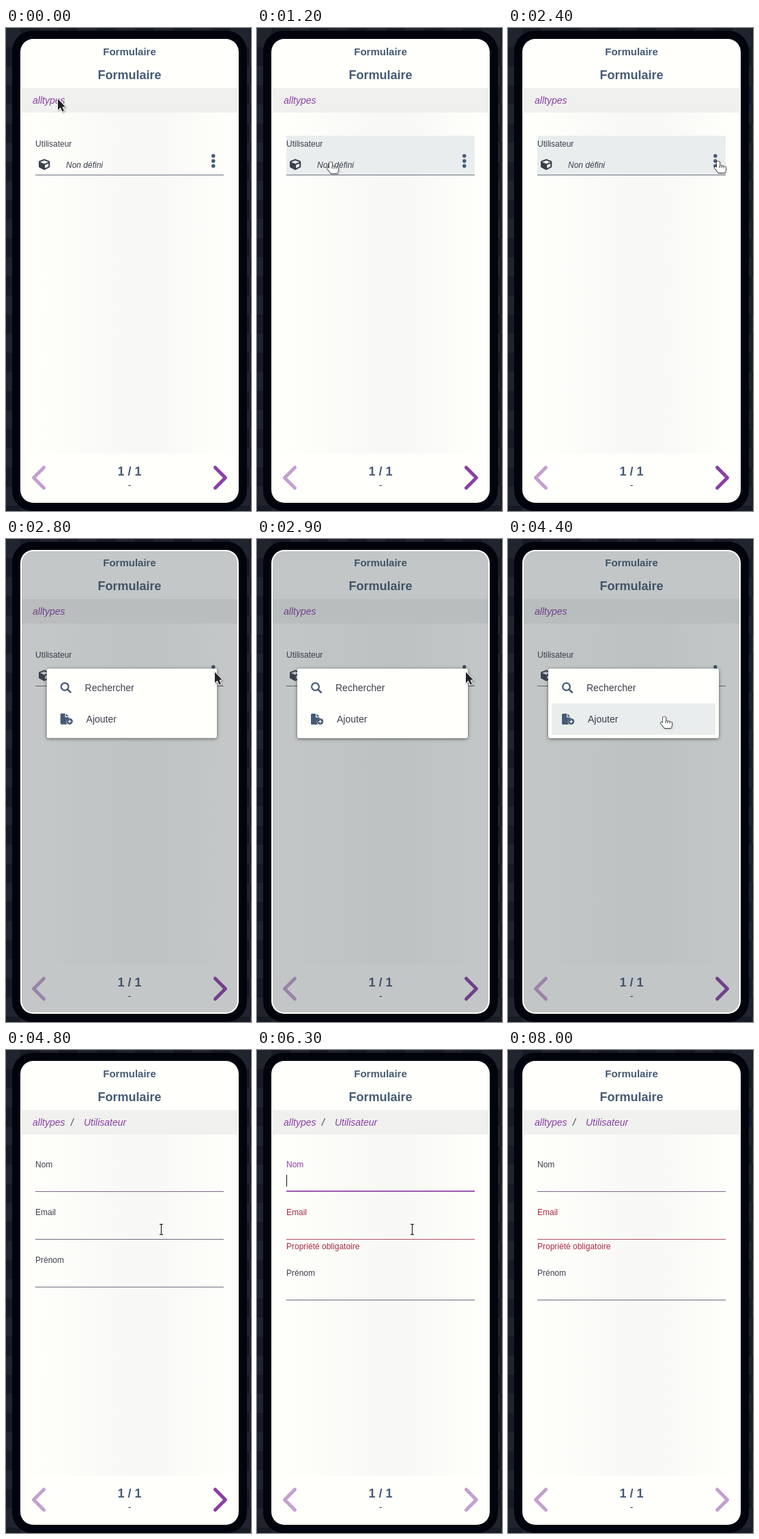
Recreate the animation shown at these times as an HTML page with a canvas. Size 359x708 px, loop 8.1 s.

```html
<!DOCTYPE html>
<html lang="fr">
<head>
<meta charset="utf-8">
<title>Formulaire</title>
<style>
  html, body { margin: 0; width: 100%; height: 100%; overflow: hidden; background: #171b26; }
  canvas { display: block; width: 359px; height: 708px; }
</style>
</head>
<body>
<canvas id="stage" width="359" height="708"></canvas>
<script>
const ctx = document.getElementById('stage').getContext('2d');
const LOOP = 8100;
const FONT = '"Liberation Sans", Arial, sans-serif';
const C = {
  paper: '#fffffb', ink: '#3b3f4e', blue: '#455a75', purple: '#8a3fa6',
  red: '#a92b41', hover: '#e9eded', line: '#6a7280'
};

// Pointer path: time, x, y
const PATH = [
  [0, 76, 104], [500, 76, 104], [1000, 104, 196], [1100, 104, 196],
  [1200, 106, 196], [1300, 106, 196], [1500, 195, 217], [1600, 257, 216],
  [1700, 303, 209], [1800, 303, 209], [2100, 305, 197], [2200, 305, 197],
  [2400, 306, 195], [2900, 306, 195], [3200, 242, 227], [3300, 242, 227],
  [3400, 237, 227], [3500, 237, 227], [3600, 236, 226], [3800, 236, 226],
  [4200, 226, 260], [4300, 226, 260], [4400, 227, 260], [7100, 227, 260],
  [7600, 217, 24], [LOOP, 217, 24]
];

const ARROW = new Path2D('M0 0V16L3.8 12.5L6.5 18.5L9 17.4L6.4 11.5H11Z');
const HAND = new Path2D('M-2 2Q-2 .3 0 .3Q2 .3 2 2V7Q4 6 5 7.4Q7 6.6 8 8.2Q11 7.6 11 10V13Q10.8 15 9.5 17H0Q-2 13.5 -5 10.5Q-5.4 8 -3.4 8.5L-2 10Z');
const CUBE = new Path2D('M239 6L31 84C12 91 0 109 0 129V354C0 373 10 389 27 397L235 501C248 508 264 508 277 501L485 397C502 389 512 373 512 354V129C512 109 500 91 481 84L273 6C262 2 250 2 239 6ZM256 68L448 140V142L256 220L64 142V140ZM288 424V276L448 211V344Z');
const PAGE = new Path2D('M80.5 256H86V261.5H91.5V263.2A5 5 0 0 0 89.5 272H80.5Q79 272 79 270.5V257.5Q79 256 80.5 256ZM87.2 256.2L91.3 260.3H87.2Z');

const clamp = v => Math.max(0, Math.min(1, v));

function pointerAt(t) {
  const i = PATH.findIndex(k => k[0] > t);
  const [t0, x0, y0] = PATH[i - 1], [t1, x1, y1] = PATH[i];
  const p = (t - t0) / (t1 - t0);
  return [x0 + (x1 - x0) * p, y0 + (y1 - y0) * p];
}

function mix(a, b, p) {
  const part = (s, i) => parseInt(s.slice(i, i + 2), 16);
  return `rgb(${[1, 3, 5].map(i => Math.round(part(a, i) + (part(b, i) - part(a, i)) * p))})`;
}

function rect(x, y, w, h, color) {
  ctx.fillStyle = color;
  ctx.fillRect(x, y, w, h);
}

function round(x, y, w, h, r, color) {
  ctx.beginPath();
  ctx.roundRect(x, y, w, h, r);
  ctx.fillStyle = color;
  ctx.fill();
}

function disc(x, y, r, color) {
  ctx.beginPath();
  ctx.arc(x, y, r, 0, Math.PI * 2);
  ctx.fillStyle = color;
  ctx.fill();
}

function text(str, x, y, size, color, style = '', align = 'left') {
  ctx.font = `${style} ${size}px ${FONT}`;
  ctx.textAlign = align;
  ctx.fillStyle = color;
  ctx.fillText(str, x, y);
}

function stroke(points, width, color) {
  ctx.beginPath();
  points.forEach(([x, y]) => ctx.lineTo(x, y));
  ctx.lineWidth = width;
  ctx.strokeStyle = color;
  ctx.stroke();
}

function chevron(x, dir, alpha) {
  ctx.save();
  ctx.globalAlpha = alpha;
  ctx.lineCap = 'round';
  ctx.lineJoin = 'round';
  stroke([[x, 644.2], [x + dir * 15, 659.2], [x, 674.2]], 5, C.purple);
  ctx.restore();
}

function phone() {
  for (let row = 0; row < 26; row++)
    for (let col = 0; col < 14; col++)
      rect(col * 28 - 7, row * 28, 28, 28, (row + col) % 2 ? '#171b26' : '#20242e');
  round(9, 4, 344, 704, 30, '#01040d');
  round(21, 16, 320, 680, 19, C.paper);
}

function frame(nested, nextAlpha) {
  const g = ctx.createLinearGradient(23, 0, 339, 0);
  g.addColorStop(0, C.paper);
  g.addColorStop(.5, '#f8f9f6');
  g.addColorStop(.62, '#f8f9f6');
  g.addColorStop(1, C.paper);
  rect(23, 124, 316, 500, g);
  rect(23, 88, 316, 36, '#f0f1ee');
  text('Formulaire', 181, 40, 15, C.blue, 'bold', 'center');
  text('Formulaire', 181, 75, 18, C.blue, 'bold', 'center');
  text('alltypes', 39, 111, 14, C.purple, 'italic');
  if (nested) {
    text('/', 95, 111, 14, C.ink, 'italic');
    text('Utilisateur', 114, 111, 14, C.purple, 'italic');
  }
  text('1 / 1', 181, 656, 18, C.blue, 'bold', 'center');
  text('-', 181, 675, 14, C.ink, '', 'center');
  chevron(55.5, -1, .5);
  chevron(306.5, 1, nextAlpha);
}

function userField(hover) {
  if (hover) rect(43, 158, 276, 57, C.hover);
  text('Utilisateur', 43, 174, 12, C.ink);
  ctx.save();
  ctx.translate(48, 192);
  ctx.scale(1 / 31.5, 1 / 31.5);
  ctx.fillStyle = C.ink;
  ctx.fill(CUBE, 'evenodd');
  ctx.restore();
  text('Non défini', 88, 205, 12, C.ink, 'italic');
  [187.5, 195, 202.3].forEach(y => disc(303.8, y, 2.7, C.blue));
  rect(43, 215, 276, 1, C.line);
}

function menu(open, py) {
  ctx.save();
  ctx.globalAlpha = clamp(open * 2);
  const s = .8 + .2 * open;
  ctx.translate(309, 190);
  ctx.scale(s, s);
  ctx.translate(-309, -190);
  ctx.save();
  ctx.shadowColor = 'rgba(0,0,0,.55)';
  ctx.shadowBlur = 5;
  ctx.shadowOffsetY = 1;
  round(59, 190, 250, 102, 3, C.paper);
  ctx.restore();
  if (py > 215) rect(64, py < 241 ? 195 : 241, 240, 46, C.hover);
  ctx.beginPath();
  ctx.arc(85.5, 216.5, 5.4, 0, Math.PI * 2);
  ctx.lineWidth = 2.2;
  ctx.strokeStyle = C.blue;
  ctx.stroke();
  ctx.lineCap = 'round';
  stroke([[89.8, 220.8], [93.8, 224.8]], 2.6, C.blue);
  text('Rechercher', 115, 223, 14, C.ink);
  ctx.fillStyle = C.blue;
  ctx.fill(PAGE);
  disc(92.6, 267.6, 4.6, C.blue);
  ctx.lineCap = 'butt';
  stroke([[90, 267.6], [95.2, 267.6]], 1.1, C.paper);
  stroke([[92.6, 265], [92.6, 270.2]], 1.1, C.paper);
  text('Ajouter', 117, 269, 14, C.ink);
  ctx.restore();
}

function form(t) {
  const check = clamp((t - 5000) / 200);
  const focus = t < 8000 ? check : 0;
  text('Nom', 43, 172, 12, mix(C.ink, C.purple, focus));
  rect(43, 207, 276, 1, mix('#80688c', '#9a5ab4', focus));
  if (focus) rect(43, 206, 276, 1, `rgba(154,90,180,${focus})`);
  const caretOn = (t >= 5200 && t < 5800) || (t >= 6300 && t < 6900) || (t >= 7400 && t < 8000);
  if (caretOn) rect(43, 183, 1, 17, '#111');
  text('Email', 43, 242, 12, mix(C.ink, C.red, check));
  rect(43, 277, 276, 1, mix('#706a7e', '#ac5064', check));
  const shift = check ? 0 : -19;
  if (check) {
    ctx.globalAlpha = check;
    text('Propriété obligatoire', 43, 292, 12, C.red);
    ctx.globalAlpha = 1;
  }
  text('Prénom', 43, 331 + shift, 12, C.ink);
  rect(43, 366 + shift, 276, 1, '#706a7e');
}

function pointer(kind, x, y) {
  ctx.save();
  if (kind === 'beam') {
    const beam = [[[225, 255.5], [230, 255.5]], [[227.5, 255], [227.5, 271]], [[225, 270.5], [230, 270.5]]];
    ctx.translate(x - 227, y - 260);
    beam.forEach(p => stroke(p, 3, 'rgba(255,255,255,.8)'));
    beam.forEach(p => stroke(p, 1.2, '#222'));
  } else {
    const hand = kind === 'hand';
    ctx.translate(x + (hand ? 2 : 0), y);
    ctx.lineJoin = 'round';
    ctx.shadowColor = 'rgba(0,0,0,.35)';
    ctx.shadowBlur = 2;
    ctx.shadowOffsetX = ctx.shadowOffsetY = 1;
    const shape = hand ? HAND : ARROW;
    ctx.lineWidth = hand ? 1.3 : 2;
    ctx.strokeStyle = hand ? '#222' : '#fff';
    ctx.stroke(shape);
    ctx.shadowColor = 'transparent';
    ctx.fillStyle = hand ? '#fff' : '#222226';
    ctx.fill(shape);
    if (hand) {
      stroke([[2, 7], [2, 10]], 1, '#222');
      stroke([[5, 7.6], [5, 10]], 1, '#222');
      stroke([[8, 8.4], [8, 10.5]], 1, '#222');
    }
  }
  ctx.restore();
}

function draw(time) {
  const t = Math.floor((time % LOOP) / 100) * 100;
  const [x, y] = pointerAt(t);
  const menuOpen = t >= 2600 && t < 4800;
  const nested = t >= 4800;
  let kind = 'arrow';
  phone();
  frame(nested, nested ? 1 - .5 * clamp((t - 5000) / 200) : 1);
  if (nested) {
    form(t);
    if ((y > 245 && y < 280) || (y > 178 && y < 207)) kind = 'beam';
  } else {
    const hover = !menuOpen && y >= 158 && y < 215;
    userField(hover);
    if (hover) kind = 'hand';
  }
  if (menuOpen) {
    const p = clamp((t - 2500) / 400);
    const open = 1 - (1 - p) ** 3;
    round(23, 18, 316, 676, 17, `rgba(55,66,76,${.3 * open})`);
    menu(open, y);
    if (y > 215) kind = 'hand';
  }
  if (t < 7700) pointer(kind, x, y);
}

const start = performance.now();
function tick() {
  draw(performance.now() - start);
  requestAnimationFrame(tick);
}
tick();
</script>
</body>
</html>
```
